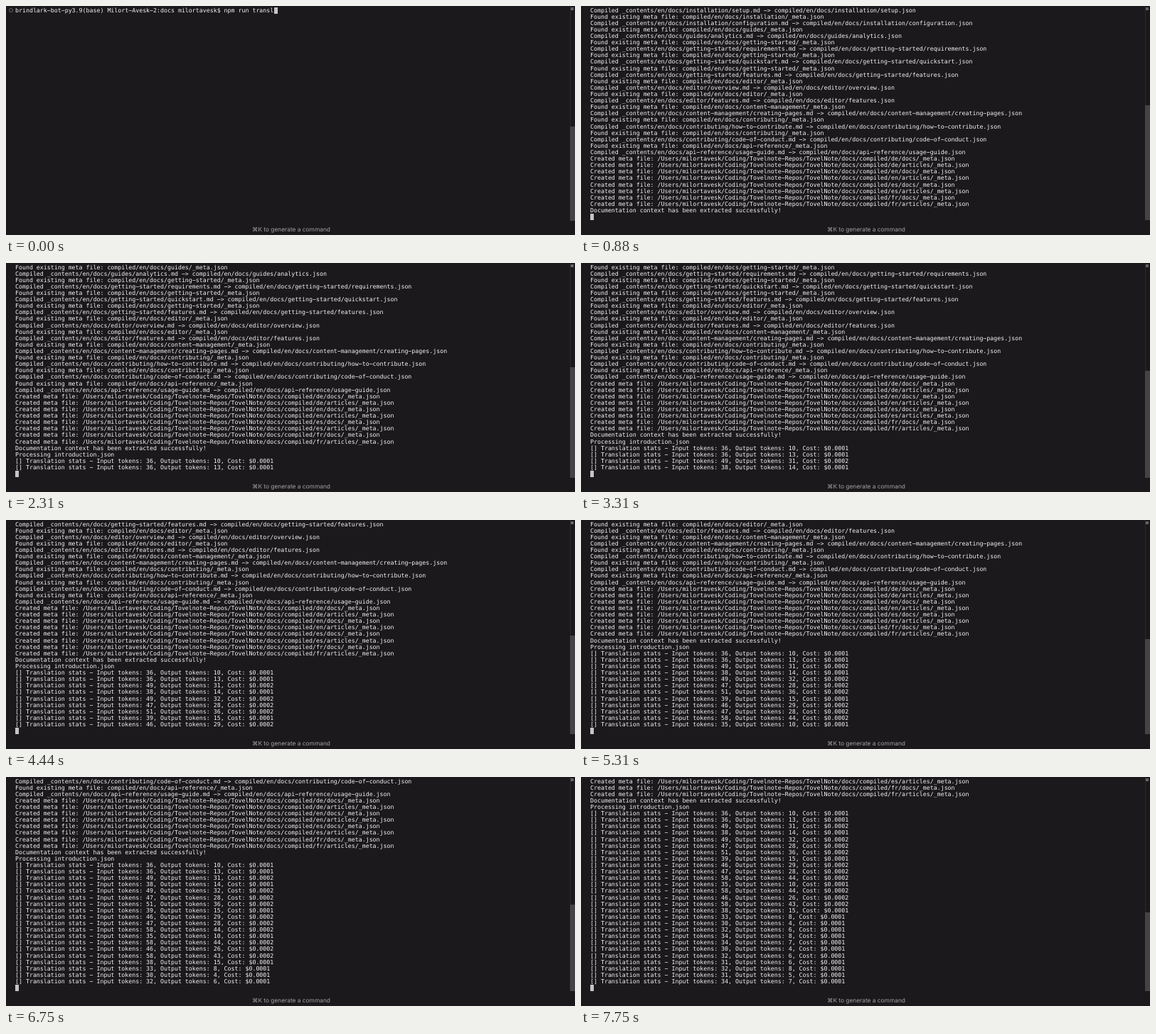
Recreate the animation shown at these times as an HTML page. Size 800x323 px, loop 8 s.

```html
<!DOCTYPE html>
<html lang="en">
<head>
<meta charset="utf-8">
<title>Terminal</title>
<style>
  html, body { margin: 0; width: 100%; height: 100%; overflow: hidden; background: #1b191c; }
  #stage { position: relative; width: 800px; height: 323px; overflow: hidden; background: #1b191c; }
  #stage > * { position: absolute; margin: 0; }
  #out {
    left: 13px; top: 1.6px; color: #f4f4f4; white-space: pre;
    font: 8.275px/9.113px "DejaVu Sans Mono", monospace;
    font-variant-ligatures: none; text-rendering: geometricPrecision;
  }
  #cursor { width: 5px; height: 9px; background: #c6c5c6; }
  #ring { left: 4px; top: 3px; width: 4px; height: 4px; border: 1px solid #69676a; border-radius: 50%; }
  #track { left: 793px; top: 0; width: 1px; height: 302px; background: #2c2a2d; }
  #thumb { left: 793px; width: 7px; background: #454346; }
  #mark { left: 794px; top: 2px; width: 4px; height: 4px; background: #656366; }
  #hint {
    left: 1px; width: 800px; top: 311px; text-align: center; color: #a3a1a4;
    font: 8.35px/11px Inter, "DejaVu Sans", sans-serif; text-rendering: geometricPrecision;
  }
</style>
</head>
<body>
<div id="stage">
  <pre id="out"></pre>
  <div id="cursor"></div>
  <div id="ring"></div>
  <div id="track"></div>
  <div id="thumb"></div>
  <div id="mark"></div>
  <div id="hint">⌘K to generate a command</div>
</div>
<script>
const LOOP = 8000, ROWS = 33, ROW_H = 9.113, CHAR_W = 4.982, LEFT = 13, TOP = 1.6;
const VIEW_H = 301, VIEW_END = 302.5, OLD_THUMB = 133, REQUESTS = 27;
const $ = id => document.getElementById(id);

const prompt = 'brindlark-bot-py3.9(base) Milort-Avesk-2:docs milortavesk$ npm run ';
const root = '/Users/milortavesk/Coding/Tovelnote-Repos/TovelNote/docs/compiled/';

const pages = `de/docs/introduction de/articles/welcome es/docs/introduction es/articles/welcome
  fr/docs/introduction fr/articles/welcome en/articles/welcome en/articles/first-steps
  en/docs/introduction en/docs/tutorials/basics en/docs/guides/themes
  en/docs/installation/setup en/docs/installation/configuration en/docs/guides/analytics
  en/docs/getting-started/requirements en/docs/getting-started/quickstart
  en/docs/getting-started/features en/docs/editor/overview en/docs/editor/features
  en/docs/content-management/creating-pages en/docs/contributing/how-to-contribute
  en/docs/contributing/code-of-conduct en/docs/api-reference/usage-guide`.split(/\s+/);

let seed = 7;
const random = () => (seed = seed * 16807 % 2147483647) / 2147483647;

// long paragraphs come first, short labels after them
function statLine(_, i) {
  const output = Math.floor(i < 16 ? 10 + 40 * random() ** 2 : 4 + 5 * random());
  const input = Math.round(27 + 0.65 * output + 3 * random());
  const cost = 1 + (output > 25) + (output > 50);
  return `[] Translation stats - Input tokens: ${input}, Output tokens: ${output}, Cost: $0.000${cost}`;
}

const lines = [
  prompt + 'translate', '', '> docs@0.1.0 translate', '> node scripts/translate.js', '',
  ...pages.flatMap(p => [
    `Found existing meta file: compiled/${p.replace(/[^/]+$/, '')}_meta.json`,
    `Compiled _contents/${p}.md -> compiled/${p}.json`
  ]),
  ...['de', 'en', 'es', 'fr'].flatMap(lang => ['docs', 'articles'].map(
    dir => `Created meta file: ${root}${lang}/${dir}/_meta.json`)),
  'Documentation context has been extracted successfully!',
  'Processing introduction.json',
  ...Array.from({ length: REQUESTS }, statLine)
];

// [time, lines finished]: jumps up to STEADY, then an even flow between the points
const STEADY = 1000;
const progress = [[0, 0], [380, 1], [500, 5], [690, 51], [750, 59], [880, 60], [STEADY, 61],
  [1440, 62], [2310, 63], [3310, 65], [3940, 69], [5310, 73], [6750, 80], [7750, 88], [LOOP, 88]];

function linesDone(t) {
  const i = progress.findLastIndex(p => p[0] <= t);
  const [t0, n0] = progress[i];
  if (t < STEADY) return n0;
  const [t1, n1] = progress[i + 1];
  return Math.floor(n0 + (n1 - n0) * (t - t0) / (t1 - t0));
}

function place(el, x, y) {
  el.style.left = x + 'px';
  el.style.top = y + 'px';
}

let shown = '';
function draw(t) {
  const done = linesDone(t);
  const typed = 'translate'.slice(0, t < 60 ? 6 : t < 130 ? 8 : 9);
  const total = done + 1;
  const first = Math.max(0, total - ROWS);
  const text = done ? lines.slice(first, done).join('\n') : prompt + typed;
  const key = done + text;
  if (key === shown) return;
  shown = key;
  // the terminal face has wide hyphens
  $('out').textContent = text.replaceAll('-', '−');

  const col = done ? 0 : text.length;
  place($('cursor'), LEFT + col * CHAR_W, TOP + (done - first) * ROW_H);
  $('ring').hidden = first > 0;

  const h = first ? ROWS * VIEW_H / total : OLD_THUMB;
  $('thumb').style.height = h + 'px';
  $('thumb').style.top = VIEW_END - h + 'px';
}

const start = performance.now();
function frame() {
  draw((performance.now() - start) % LOOP);
  requestAnimationFrame(frame);
}
frame();
</script>
</body>
</html>
```
